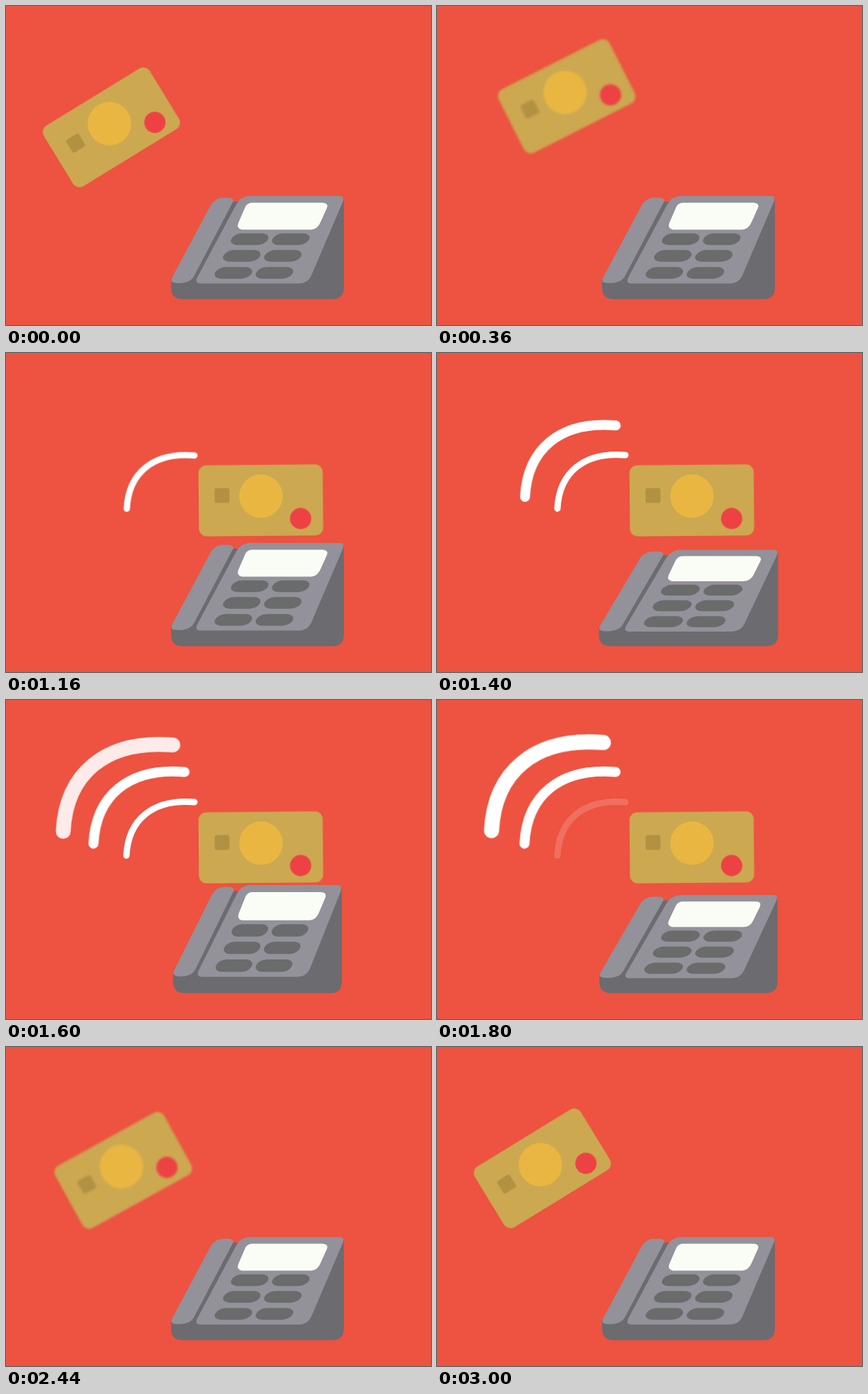
These frames come from a looping animation (600 px wide and 450 px high, 4040 ms). An HTML page without scripts:

```html
<!DOCTYPE html>
<html lang="en">
<head>
<meta charset="utf-8">
<title>Contactless payment</title>
<style>
html, body { margin: 0; width: 100%; height: 100%; overflow: hidden; background: #ed5340; }
svg { display: block; width: 100%; height: 100%; }
.light { fill: #93919a; }
.dark { fill: #6c6b70; }
.key { fill: #6a6b6b; }

/* card: sideways, lift and tilt each have their own easing */
.side { animation: side 4.04s infinite, smear 4.04s linear infinite; }
.card { animation: lift 4.04s infinite, tilt 4.04s infinite; }
@keyframes side {
  0% { translate: 146px; animation-timing-function: cubic-bezier(.8, 0, .65, 1); }
  19.8%, 51.5% { translate: 360px; animation-timing-function: cubic-bezier(.4, 0, .27, 1); }
  64.4%, 100% { translate: 146px; }
}
@keyframes lift {
  0% { translate: 0 166px; animation-timing-function: ease-in-out; }
  8.9% { translate: 0 122px; animation-timing-function: cubic-bezier(.45, 0, .42, 1); }
  19.8%, 51.5% { translate: 0 202px; animation-timing-function: cubic-bezier(.4, 0, .25, 1); }
  64.4%, 100% { translate: 0 166px; }
}
@keyframes tilt {
  0% { rotate: -31.5deg; animation-timing-function: cubic-bezier(.8, 0, .75, 1); }
  19.8%, 51.5% { rotate: -.5deg; animation-timing-function: cubic-bezier(.4, 0, .29, 1); }
  64.4%, 100% { rotate: -31.5deg; }
}
@keyframes smear {
  0%, 19.8%, 51.5%, 64.4%, 100% { filter: blur(0); }
  14%, 57% { filter: blur(2.5px); }
}

/* waves: staggered in, then staggered out */
.wave {
  fill: none; stroke: #fff; stroke-linecap: round;
  animation: appear 4.04s calc(.96s + var(--i) * .24s) linear infinite backwards,
    grow 4.04s calc(.96s + var(--i) * .24s) infinite backwards,
    vanish 4.04s calc(1.7s + var(--i) * .14s) linear infinite backwards;
}
@keyframes appear {
  0%, 50.1%, 100% { stroke-opacity: 0; }
  4.5%, 50% { stroke-opacity: 1; }
}
@keyframes grow {
  0% { scale: .8; animation-timing-function: cubic-bezier(0, .3, .5, 1); }
  6%, 100% { scale: 1; }
}
@keyframes vanish {
  0%, 50.1%, 100% { opacity: 1; }
  3%, 50% { opacity: 0; }
}

/* terminal: squash and stretch on its base */
.terminal { transform-origin: 355px 413px; animation: bounce 4.04s ease-in-out infinite; }
@keyframes bounce {
  0%, 32.7%, 50%, 100% { scale: 1 1; }
  36% { scale: 1.055 .9; }
  40.5% { scale: .97 1.06; }
  44.5% { scale: 1.03 .95; }
}
</style>
</head>
<body>
<svg viewBox="0 0 600 450">
  <defs>
    <rect id="key" class="key" x="-26" y="-8.3" width="52" height="16.6" rx="12" ry="8.3" transform="skewX(-22)"/>
    <g id="row">
      <use href="#key" x="-29"/>
      <use href="#key" x="29"/>
    </g>
    <path id="arc" d="M0 75.5C2.500 26 36-5 96 0"/>
  </defs>

  <g transform="translate(270 240)">
    <g class="wave" style="--i: 0">
      <use href="#arc" transform="translate(-100 -96)" stroke-width="9"/>
    </g>
    <g class="wave" style="--i: 1">
      <use href="#arc" transform="translate(-146.500 -138.500) scale(1.34)" stroke-width="10.500"/>
    </g>
    <g class="wave" style="--i: 2">
      <use href="#arc" transform="translate(-193 -180) scale(1.645)" stroke-width="13"/>
    </g>
  </g>

  <g class="terminal">
    <path class="dark" d="M233 385V397Q233 413.500 249 413.500H461Q477 413.500 477 397V272L330 276H321L300 300Z"/>
    <path class="light" d="M289 281Q295 271 306 270.500H314Q323 271 320 277L266 380Q261 391 244 391Q229 391 235 382Z"/>
    <path class="light" d="M325 280Q331 269 343 268H471Q478 268 476 275L432 378Q427 391.500 413 391.500H274Q266 391 270 383Z"/>
    <path d="M338 283Q341 277.500 348 277.500H447Q456 278 453 285L444 305Q440 315 430 315.500H333Q325 314 328 306Z" fill="#fafdf5"/>
    <use href="#row" x="373" y="329"/>
    <use href="#row" x="361.800" y="352.500"/>
    <use href="#row" x="350" y="376.500"/>
  </g>

  <g class="side">
    <g class="card">
      <rect x="-88" y="-44.300" width="175.400" height="100.200" rx="11" fill="#cca851"/>
      <circle r="30.700" fill="#e9b741"/>
      <rect x="-65.500" y="-12" width="21" height="21" rx="3" fill="#b29142"/>
      <circle cx="55.700" cy="32" r="15" fill="#ee4144"/>
    </g>
  </g>
</svg>
</body>
</html>
```
